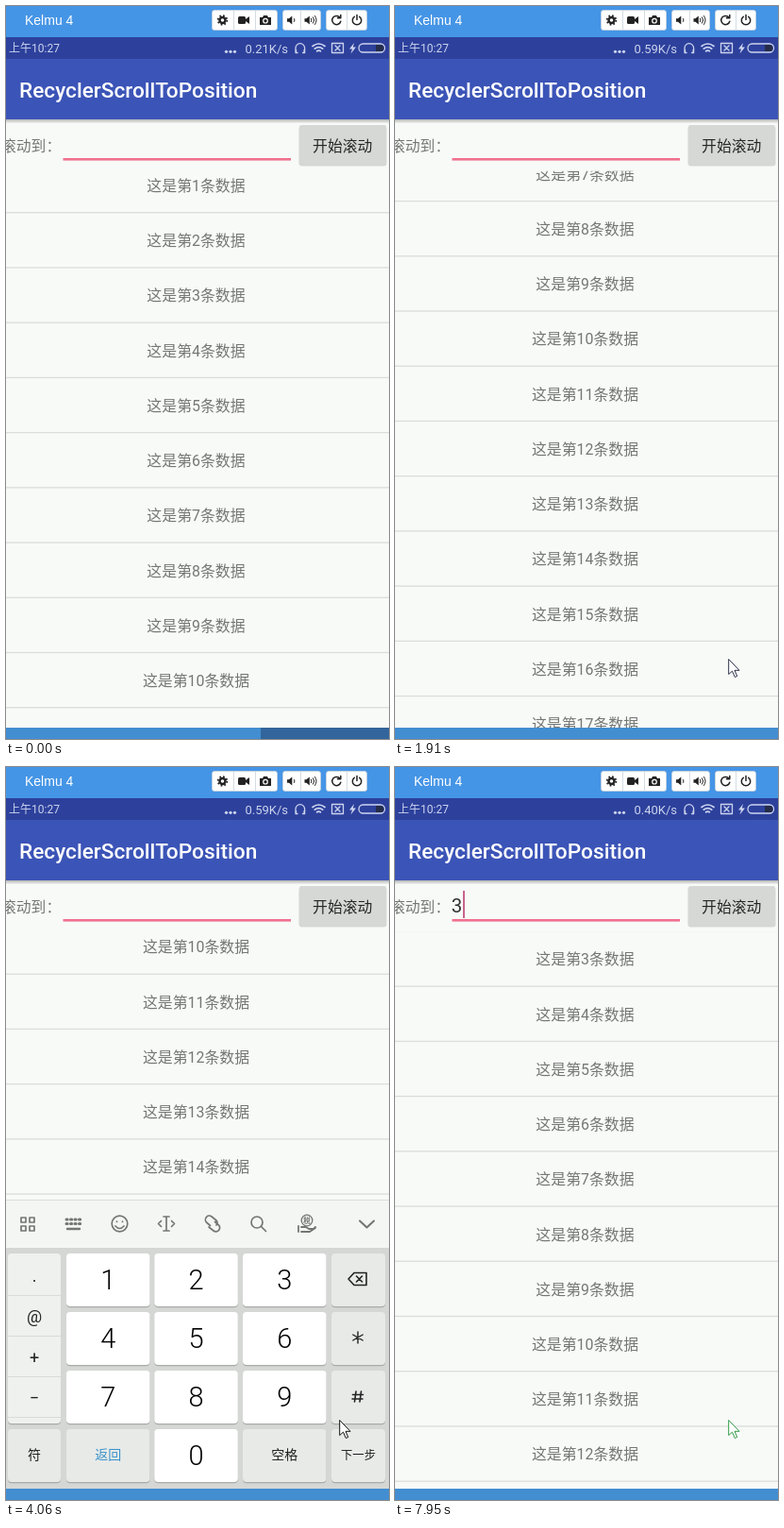
Animation, 406 px wide and 776 px high, one loop 8 s. Source, as an HTML page:

```html
<!DOCTYPE html>
<html lang="zh">
<head>
<meta charset="utf-8">
<title>RecyclerScrollToPosition</title>
<style>
  html, body { margin: 0; width: 100%; height: 100%; overflow: hidden; background: #f8faf8; }
  svg { display: block; width: 100%; height: 100%; }
  text { font-family: Roboto, "Noto Sans CJK SC", "Noto Sans CJK", sans-serif; }
  .mid { text-anchor: middle; }
  .line { fill: none; stroke-linecap: round; stroke-linejoin: round; }
</style>
</head>
<body>
<svg viewBox="0 0 406 776">
  <defs>
    <clipPath id="listClip"><path d="M0 174.800H406V764H0Z"/></clipPath>
    <clipPath id="screenClip"><path d="M0 120H406V764H0Z"/></clipPath>
    <linearGradient id="shade" x2="0" y2="1">
      <stop stop-color="#000" stop-opacity=".28"/><stop offset="1" stop-color="#000" stop-opacity="0"/>
    </linearGradient>
  </defs>
  <rect width="406" height="776" fill="#f8faf8"/>

  <!-- list -->
  <g clip-path="url(#listClip)"><g id="rows" font-size="15.9" fill="#757775"></g></g>

  <!-- input row -->
  <text x="-5" y="153.5" font-size="15.8" fill="#757775">滚动到：</text>
  <rect x="60.5" y="161" width="241.5" height="2.6" fill="#f0708f"/>
  <text id="entry" x="59.8" y="154" font-size="20.5" fill="#333">3</text>
  <rect id="caret" y="131" width="2" height="29" fill="#c8648a"/>
  <rect id="lift" x="310.5" y="127" width="93" height="42.5" rx="3" fill="#000"/>
  <rect x="311" y="126" width="92" height="42" rx="2" fill="#d6d8d6"/>
  <text x="356.7" y="153.5" class="mid" font-size="15.8" font-weight="500" fill="#252725">开始滚动</text>

  <!-- keyboard -->
  <g clip-path="url(#screenClip)"><g id="keyboard">
    <rect y="458" width="406" height="306" fill="#d5d7d5"/>
    <rect y="458" width="406" height="51" fill="#f4f6f4"/>
    <path d="M0 458.5H406" stroke="#dadcda"/>
    <rect id="collapse" x="358" y="459" width="48" height="49" rx="3"/>
    <g class="line" stroke="#747674" stroke-width="1.7">
      <path d="M16 477h5v5h-5zM25 477h5v5h-5zM16 486h5v5h-5zM25 486h5v5h-5z"/>
      <path d="M64 479H79M64 483.5H79" stroke-width="3" stroke-dasharray="1.2 3.3"/>
      <path d="M65 489H78" stroke-width="2.4"/>
      <circle cx="120.5" cy="483.5" r="8.3"/>
      <path d="M117.5 481v.5M123.5 481v.5M116 486q4.5 5 9 0"/>
      <path d="M167 476h6M167 491h6M170 476v15M164.500 480.500l-3 3 3 3M175.500 480.500l3 3-3 3"/>
      <path d="M216.500 485.500l-3.500-3a4 4 0 0 1 5-6.500l5 4a4 4 0 0 1 0 5M221.500 481.500l3.500 3a4 4 0 0 1-5 6.500l-5-4"/>
      <circle cx="266" cy="482" r="6"/><path d="M270.5 486.5l5 5"/>
      <circle cx="319" cy="480" r="5.8" stroke-width="1.3"/>
      <path d="M310 486v6M313 487h5l3 2h5l2-2M313 492h9l6-4" stroke-width="1.8"/>
      <path d="M375 480.5l7.5 7 7.5-7" stroke-width="2.1"/>
    </g>
    <text x="319" y="483" class="mid" font-size="7.5" font-weight="700" fill="#747674">税</text>
    <g id="keys"></g>
    <g class="line" stroke="#222" stroke-width="1.6">
      <path d="M369 535.5h13v13h-13l-6-6.5zM371.5 539l6 6M377.5 539l-6 6"/>
      <path d="M373 598v12M367.8 601l10.4 6M378.2 601l-10.4 6" stroke-width="1.4"/>
      <path d="M371 661l-1.5 11M376.5 661l-1.5 11M367.5 664.5h11M367 669h11"/>
    </g>
  </g></g>

  <!-- app bar and status bar -->
  <rect y="120" width="406" height="4.5" fill="url(#shade)"/>
  <rect y="56" width="406" height="64" fill="#3b54b7"/>
  <text x="14" y="97" font-size="22.65" font-weight="500" fill="#fff">RecyclerScrollToPosition</text>
  <rect y="33" width="406" height="23" fill="#2d419c"/>
  <g fill="#cdd4ee">
    <text x="3" y="49.3" font-size="12">上午10:27</text>
    <text id="speed" x="299" y="49.5" font-size="13" text-anchor="end"></text>
    <circle cx="233.5" cy="48.3" r="1.6"/><circle cx="238" cy="48.3" r="1.6"/><circle cx="242.5" cy="48.3" r="1.6"/>
    <path d="M369 39l-5 6.5h3l-1.5 5 5.5-7h-3.2z"/>
  </g>
  <g class="line" stroke="#cdd4ee" stroke-width="1.3">
    <path d="M307 49.5v-5a4.8 4.8 0 0 1 9.6 0v5M307.5 46.5v3h1.500M316.100 46.500v3h-1.500"/>
    <path d="M325 42.5q6.5-5 13 0M327.3 45.2q4.2-3.2 8.4 0M329.6 47.8q1.9-1.4 3.8 0" stroke-width="1.7"/>
    <path d="M345.5 39.5h12v10h-12zM349 42l5 5M354 42l-5 5"/>
    <rect x="374" y="40" width="27.5" height="9" rx="4.5"/>
  </g>
  <path d="M392 41h5a3.500 3.500 0 0 1 0 7h-5z" fill="#252c49"/>

  <!-- mirror window frame -->
  <rect width="406" height="33" fill="#4595e6"/>
  <text x="20" y="20" font-size="14" fill="#fff" style="font-family:'Liberation Sans',Arial,sans-serif">Kelmu 4</text>
  <g fill="#fff" stroke="#c9d3dc" stroke-width=".8">
    <rect x="218.5" y="4.5" width="69" height="21" rx="2.5"/>
    <rect x="293.5" y="4.5" width="40" height="21" rx="2.5"/>
    <rect x="339.5" y="4.5" width="43" height="21" rx="2.5"/>
    <path d="M241.5 5v20M264.5 5v20M312.5 5v20M361.5 5v20"/>
  </g>
  <g class="line" stroke="#222" stroke-width="1.5">
    <circle cx="229.5" cy="15" r="3" stroke-width="2.4"/>
    <circle cx="229.5" cy="15" r="4.8" stroke-width="1.8" stroke-dasharray="1.7 2.07" stroke-linecap="butt"/>
    <path d="M354 12.2a4.6 4.6 0 1 0 .8 4M354.8 9.5v3.3h-3.3"/>
    <path d="M369.3 11.3a4.7 4.7 0 1 0 5.4 0M372 9.5v5"/>
    <path d="M305.5 13.5q1.2 1.5 0 3M323.5 13.3q1.3 1.7 0 3.4M325.5 11.8q2.5 3.2 0 6.4M327.5 10.5q3.2 4.5 0 9" stroke-width="1"/>
  </g>
  <g fill="#222">
    <rect x="246" y="11" width="8" height="8" rx="1.5"/><path d="M254 14l4-3v8l-4-3z"/>
    <path d="M269 12h3l1-2h4l1 2h3v8h-12z"/>
    <path id="horn" d="M298 13.3h2l3.3-2.8v9l-3.3-2.8h-2z"/><use href="#horn" x="18.5"/>
  </g>
  <circle cx="275" cy="15.7" r="2.3" fill="none" stroke="#fff" stroke-width="1.2"/>
  <rect y="764" width="406" height="12" fill="#428ed1"/>
  <rect id="dock" x="270" y="764" width="136" height="12" fill="#32659b"/>

  <path id="pointer" d="M0 0V16L3.8 12.6 6.6 19 9 18 6.3 11.8H11.3Z" fill="#fff" stroke-linejoin="round"/>
</svg>

<script>
const LOOP = 8000, ROW = 58.22, FLUNG = 523.5, TARGET = 103;
const $ = id => document.getElementById(id);
const clamp = x => Math.max(0, Math.min(1, x));
const progress = (t, from, to) => clamp((t - from) / (to - from));
const easeOut = (u, power) => 1 - (1 - u) ** power;
const show = (id, on) => $(id).setAttribute('visibility', on ? 'visible' : 'hidden');
const move = (id, x, y) => $(id).setAttribute('transform', `translate(${x} ${y})`);

function buildRows() {
  let out = '';
  for (let i = 0; i < 22; i++) {
    const y = 190.2 + i * ROW;
    out += `<text x="201.5" y="${y + 5.8}" class="mid">这是第${i + 1}条数据</text>
      <rect y="${y + 27.9}" width="406" height="1.3" fill="#dbdddb"/>`;
  }
  $('rows').innerHTML = out;
}

function key(x, y, w, h, fill, label = '', size = 14, weight = 500, color = '#1c1c1c') {
  return `<rect x="${x}" y="${y + 1.3}" width="${w}" height="${h}" rx="4" fill="#a9aba9"/>
    <rect x="${x}" y="${y}" width="${w}" height="${h}" rx="4" fill="${fill}"/>
    <text x="${x + w / 2}" y="${y + h / 2 + size * .36 - .8}" class="mid"
      font-size="${size}" font-weight="${weight}" fill="${color}">${label}</text>`;
}

function buildKeys() {
  const grey = '#e8eae8', cols = [64, 157.3, 251], rowY = r => 515 + r * 62;
  const digit = (n, col, row) => key(cols[col], rowY(row), 88.5, 56, '#fff', n, 29, 300, '#000');
  let out = key(2, 515, 56, 180, '#eff1ef');
  ['.', '@', '+', '−'].forEach((s, i) => {
    const y = 559.5 + i * 43;
    out += `<path d="M2 ${y}H58" stroke="#d9dbd9"/>
      <text x="30" y="${y - 14.5}" class="mid" font-size="18" fill="#222">${s}</text>`;
  });
  out += '<path d="M2 688.5H58" stroke="#d9dbd9"/>';
  for (let n = 1; n <= 9; n++) out += digit(n, (n - 1) % 3, Math.floor((n - 1) / 3));
  for (let r = 0; r < 4; r++) out += key(345, rowY(r), 57, 56, grey, r == 3 ? '下一步' : '', 12.3, 400);
  out += key(2, rowY(3), 56, 56, grey, '符') + key(cols[0], rowY(3), 88.5, 56, grey, '返回', 14, 500, '#3a92cb')
       + digit(0, 1, 3) + key(cols[2], rowY(3), 88.5, 56, grey, '空格');
  $('keys').innerHTML = out;
}

function scrollAt(t) {
  if (t < 6500) return FLUNG * easeOut(progress(t, 945, 2609), 1.35);
  return FLUNG + (TARGET - FLUNG) * easeOut(progress(t, 6500, 6960), 2);
}

function caretOn(t) {
  const start = t < 3500 ? 70 : t < 4840 ? 3500 : 4840;
  return t >= start && (t - start) % 1000 < 500;
}

function draw(t) {
  const typed = t >= 4840;
  move('rows', 0, -scrollAt(t));

  const raised = easeOut(progress(t, 3600, 3880), 2) - progress(t, 5690, 5930) ** 2;
  move('keyboard', 0, 306 * (1 - raised));
  show('keyboard', raised > 0);
  $('collapse').setAttribute('fill', t > 5450 ? '#e2e4e2' : '#f4f6f4');

  show('entry', typed);
  show('caret', caretOn(t));
  $('caret').setAttribute('x', typed ? 72 : 60.7);
  $('speed').textContent = t < 740 ? '0.21K/s' : t < 4700 ? '0.59K/s' : '0.40K/s';
  $('lift').setAttribute('opacity', t > 6450 && t < 6700 ? .25 : .14);

  show('dock', t < 70);
  const arrival = easeOut(progress(t, 150, 560), 2);
  move('pointer', 353.7, 780 - 88.5 * arrival);
  $('pointer').setAttribute('stroke', raised > 0 ? '#111' : t > 2640 ? '#2f9a48' : '#2c3048');
}

function tick() {
  draw(performance.now() % LOOP);
  requestAnimationFrame(tick);
}

buildRows();
buildKeys();
tick();
</script>
</body>
</html>
```
